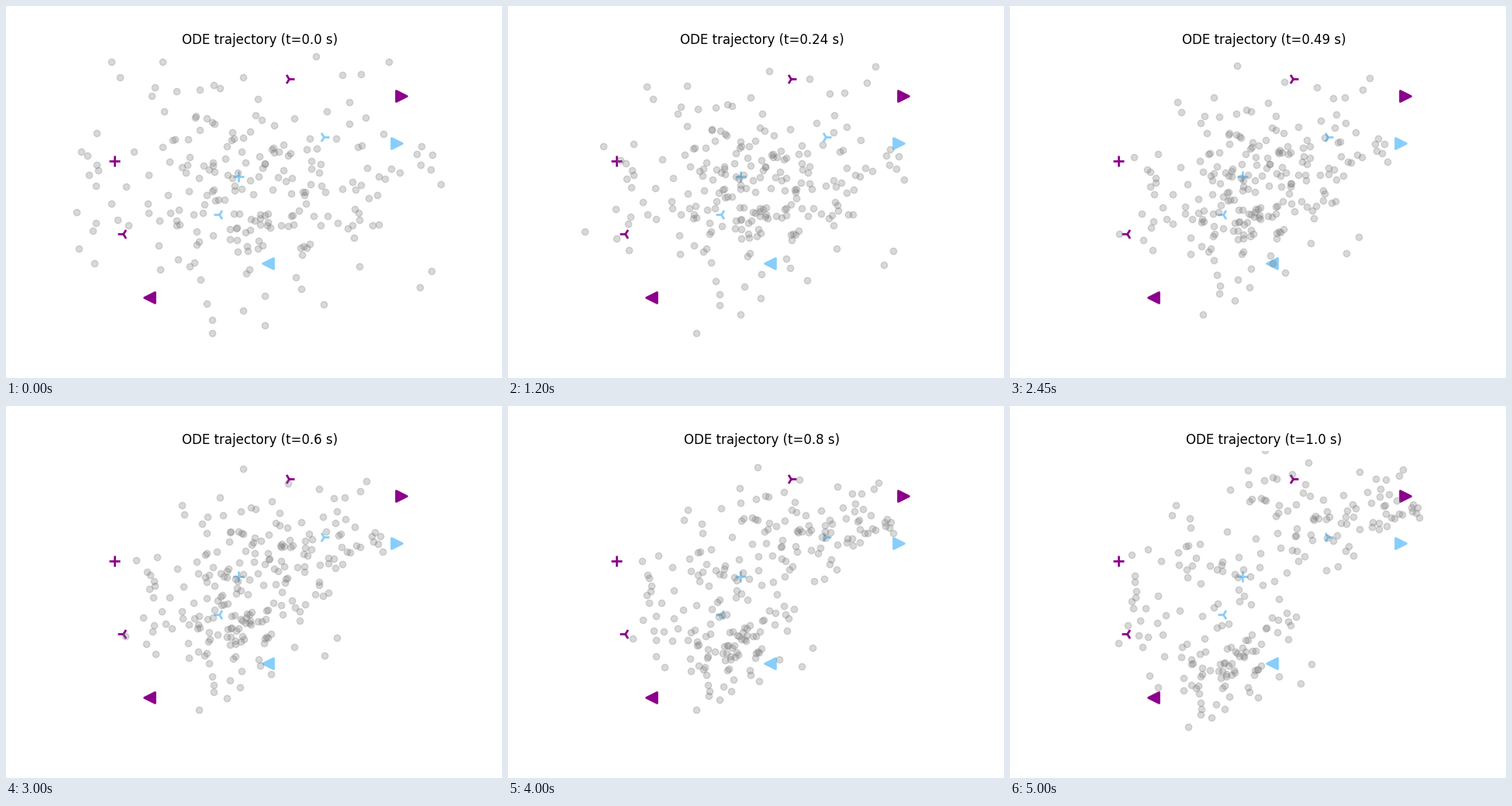
A matplotlib script for the animation above (5550 ms loop, 640x480 px).

```python
import numpy as np
import matplotlib.pyplot as plt
from matplotlib.animation import FuncAnimation

STEPS, HOLD = 100, 10
DT = 1 / STEPS

# Start density: one wide Gaussian. End density: a mixture of small ones.
START_MEAN, START_STD = np.array([312, 229]), np.array([103, 77])
END_MEANS = np.array([
    (345, 105), (440, 120), (485, 135), (395, 160),  # upper right
    (220, 185), (190, 265), (305, 210), (325, 275),  # left and middle
    (240, 360), (265, 335), (310, 345)])             # bottom
END_STD = np.array([30, 22])

# The few particles that start far from the rest
LONERS = [(136, 72), (147, 92), (202, 72), (91, 266), (116, 232), (114, 332),
          (266, 405), (266, 422), (549, 342), (534, 363), (561, 230),
          (494, 72), (458, 88), (400, 65), (550, 192), (536, 181)]
CROWD = 215

SYMBOLS = "+43><"
MARKS = {
    "darkmagenta": [(140, 200), (365, 93.5), (151, 293.5), (510, 115.5),
                    (184.5, 375.5)],
    "lightskyblue": [(300, 220), (410, 168.5), (275, 268.5), (504, 176.5),
                     (337.5, 331.5)]}


def velocity(pos, t):
    """Flow that carries the start density into the end mixture."""
    s = 1 - t
    var = (s * START_STD) ** 2 + (t * END_STD) ** 2
    off = pos[:, None] - s * START_MEAN - t * END_MEANS
    weight = np.exp(-0.5 * (off ** 2 / var).sum(axis=2)) + 1e-300
    weight /= weight.sum(axis=1, keepdims=True)
    pull = (t * END_STD ** 2 - s * START_STD ** 2) / var * off
    return (weight[..., None] * (END_MEANS - START_MEAN + pull)).sum(axis=1)


rng = np.random.default_rng(3)
crowd = rng.normal(START_MEAN, 0.93 * START_STD, (CROWD, 2))
path = [np.vstack([LONERS, crowd])]
for n in range(STEPS):
    pos, t = path[-1], n * DT
    half = pos + velocity(pos, t) * DT / 2
    path.append(pos + velocity(half, t + DT / 2) * DT)

fig, ax = plt.subplots(figsize=(6.4, 4.8), dpi=100)
ax.set_axis_off()
ax.set_xlim(80, 576)
ax.set_ylim(427.2, 57.6)  # axes units are stage pixels
for colour, places in MARKS.items():
    for symbol, (x, y) in zip(SYMBOLS, places):
        ax.scatter(x, y, s=100, marker=symbol, color=colour, linewidths=2)
dots = ax.scatter(*path[0].T, color="gray", alpha=0.3)
title = ax.set_title("")


def update(frame):
    n = min(frame, STEPS)
    dots.set_offsets(path[n])
    title.set_text(f"ODE trajectory (t={round(n * DT, 2)} s)")
    return dots, title


anim = FuncAnimation(fig, update, frames=STEPS + HOLD + 1, interval=50,
                     repeat=True)
plt.show()
```
